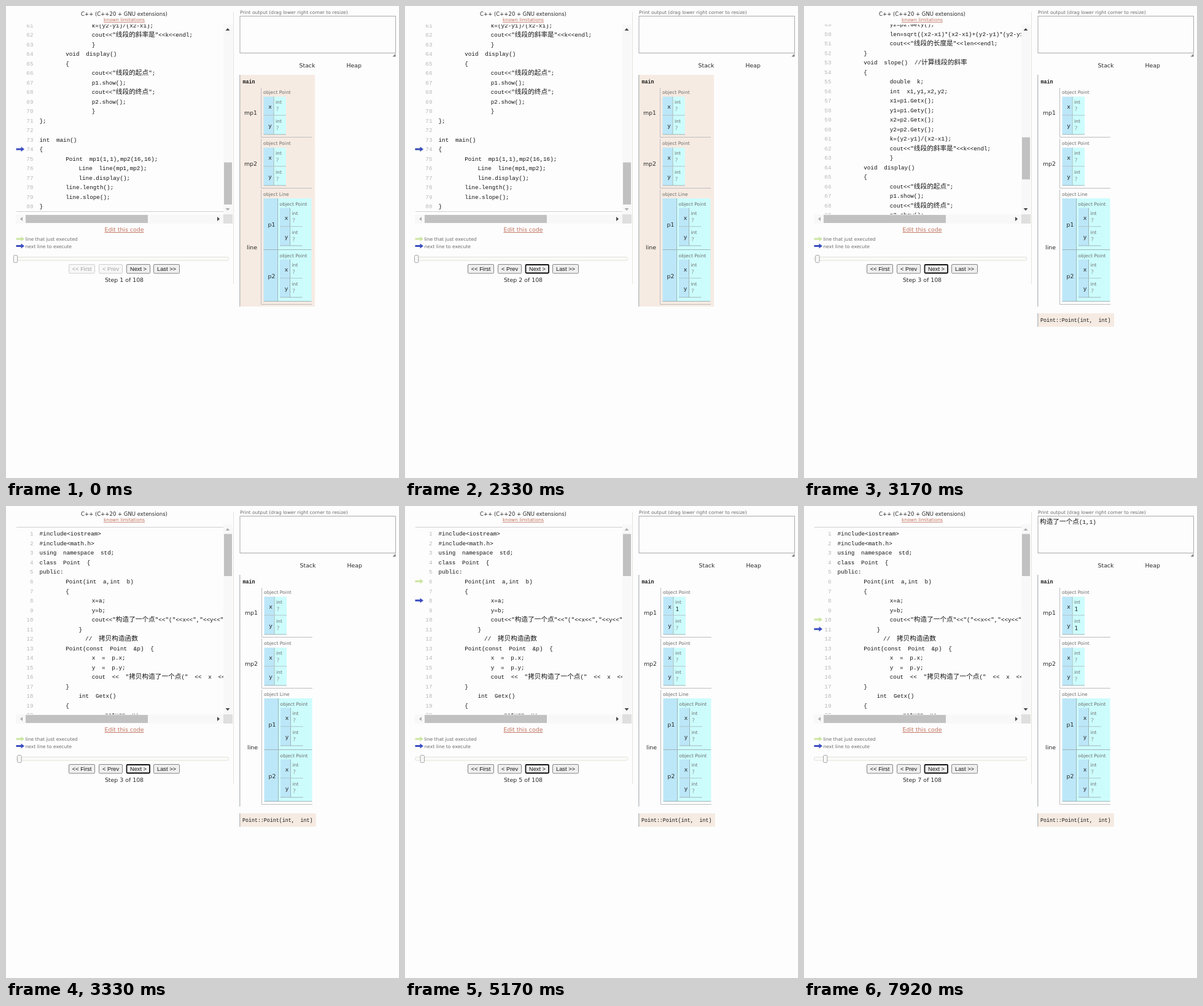
An HTML page for the animation above (8000 ms loop, 640 by 768 pixels).

```html
<!DOCTYPE html>
<html lang="en">
<head>
<meta charset="utf-8">
<title>Step-by-step code visualizer</title>
<style>
html, body { margin: 0; width: 100%; height: 100%; overflow: hidden; background: #fdfdfd; }
svg { display: block; width: 640px; height: 768px; }
text { font-family: "DejaVu Sans", sans-serif; font-size: 9.4px; fill: #2a2a2a; white-space: pre; }
.small { font-size: 7.6px; fill: #6c6c6c; }
.title { font-size: 8.5px; }
.link { fill: #c0705c; text-decoration: underline; }
.button { font: 9.3px "Liberation Sans", sans-serif; fill: #181818; }
.code { font: 9.3px "Liberation Mono", monospace; fill: #141414; }
.code tspan { font: 10.67px "Noto Sans CJK SC", "Noto Sans CJK", sans-serif; }
.call { font-size: 8.3px; }
.call tspan { font-size: 9.9px; }
.number { fill: #b8b8b8; }
.unset { fill: #8f9b9b; }
</style>
</head>
<body>
<svg id="stage" viewBox="0 0 640 768"></svg>
<script>
const PITCH = 15.52, MAX_SCROLL = 945, LOOP = 8000, FRAME = 250 / 3;
const STARTS = [0, 2300, 3103, 4290, 5165, 6050, 6920];
const NEXT_LINES = [74, 75, 6, 8, 9, 10, 11];
const SCROLL_START = 3105, SCROLL_TIME = 223;

const PAPER = "#fdfdfd", PEACH = "#f6ebe2", KEY = "#bce7f8", VALUE = "#cdfcfc";
const RULE = "#bdbdc2", CELL_RULE = "#9fb4b8", FRAME_EDGE = "#b9bfc2";
const TRACK = "#f8f8f8", THUMB = "#c1c1c1", DARK = "#484848", FADED = "#adadad";
const GREEN = "#cbe6a2", BLUE = "#3a4cc0";

const SOURCE = `#include<iostream>
#include<math.h>
using namespace std;
class Point {
public:
    Point(int a,int b)
    {
        x=a;
        y=b;
        cout<<"构造了一个点"<<"("<<x<<","<<y<<")"<<endl;
      }
       // 拷贝构造函数
    Point(const Point &p) {
        x = p.x;
        y = p.y;
        cout << "拷贝构造了一个点(" << x << "," << y << ")" << endl;
    }
      int Getx()
    {
          return x;
    }
      int Gety()
    {
          return y;
    }
    void show()
    {
        cout<<"("<<x<<","<<y<<")"<<endl;
    }
private:
    int x,y;
};

class Line {
private:
    Point p1,p2;
public:
    Line(Point a,Point b):p1(a),p2(b)
    {
    }
    void length() //计算线段的长度
    {
        double len;
        int x1,y1,x2,y2;
        x1=p1.Getx();
        y1=p1.Gety();

        x2=p2.Getx();
        y2=p2.Gety();
        len=sqrt((x2-x1)*(x2-x1)+(y2-y1)*(y2-y1));
        cout<<"线段的长度是"<<len<<endl;
    }
    void slope() //计算线段的斜率
    {
        double k;
        int x1,y1,x2,y2;
        x1=p1.Getx();
        y1=p1.Gety();
        x2=p2.Getx();
        y2=p2.Gety();
        k=(y2-y1)/(x2-x1);
        cout<<"线段的斜率是"<<k<<endl;
        }
    void display()
    {
        cout<<"线段的起点";
        p1.show();
        cout<<"线段的终点";
        p2.show();
        }
};

int main()
{
    Point mp1(1,1),mp2(16,16);
      Line line(mp1,mp2);
      line.display();
    line.length();
    line.slope();
}`.split("\n");

const escapeText = s => s.replace(/&/g, "&amp;").replace(/</g, "&lt;");
const text = (x, y, s, cls = "", extra = "") =>
  `<text x="${x}" y="${y}" class="${cls}" ${extra}>${escapeText(s)}</text>`;
const centered = (x, y, s, cls, extra = "") => text(x, y, s, cls, `text-anchor="middle" ${extra}`);
const rightAligned = (x, y, s, cls) => text(x, y, s, cls, 'text-anchor="end"');
const rect = (x, y, w, h, fill, extra = "") =>
  `<rect x="${x}" y="${y}" width="${w}" height="${h}" fill="${fill}" ${extra}/>`;
const path = (d, fill, extra = "") => `<path d="${d}" fill="${fill}" ${extra}/>`;
const line = (d, color) => path(d, "none", `stroke="${color}"`);

// Spaces and Chinese characters are full width, Latin characters half width.
const code = (x, y, s, cls = "", extra = "") =>
  `<text x="${x}" y="${y}" class="code ${cls}" ${extra}>` +
  escapeText(s).replace(/[ \u3000-\u9fff]+/g, m => `<tspan>${m.replace(/ /g, "\u3000")}</tspan>`) +
  "</text>";

const arrow = (id, color, y = 0) =>
  `<g id="${id}" transform="translate(16.5 ${y})">` +
  path("M0-1.5H8V-4L13.5 0L8 4V1.5H0Z", color) + "</g>";

const button = (x, w, label, id) => `<g id="${id}">` +
  rect(x + .5, 420.5, w - 1, 14.5, "#efefef", 'rx="1.5" stroke="#858585"') +
  centered(x + w / 2, 431, label, "button") + "</g>";

function listing() {
  const rows = SOURCE.map((s, i) => {
    const y = 48.4 + i * PITCH;
    return rightAligned(44.5, y, String(i + 1), "code number") + code(54.5, y, s);
  }).join("");
  const border = y => line(`M17 ${y}H355`, "#cfcfcf");
  return `<clipPath id="view"><rect x="12" y="30" width="342" height="309"/></clipPath>
    <g clip-path="url(#view)"><g id="listing">${border(34.5)}${border(1279.5)}${rows}
    ${arrow("executed", GREEN)}${arrow("next", BLUE)}</g></g>`;
}

function scrollbars() {
  return rect(354, 30, 15, 309, TRACK) + rect(16, 339, 338, 15, TRACK) +
    rect(354, 339, 15, 15, "#dfdfdf") + rect(32, 340, 199, 13, THUMB) +
    rect(355, 0, 13, 68.5, THUMB, 'id="thumb"') +
    path("M357.5 40H364.5L361 36Z", DARK, 'id="up"') +
    path("M357.5 329H364.5L361 333Z", DARK, 'id="down"') +
    path("M27 343V350L23 346.5Z", FADED) + path("M344 343V350L348 346.5Z", DARK);
}

function fields(x, y, prefix) {
  return ["x", "y"].map((name, i) => {
    const top = y + i * 31;
    return rect(x, top, 16, 30.5, KEY) + rect(x + 16, top, 20.5, 30.5, VALUE) +
      line(`M${x + 16.5} ${top}V${top + 30.5}M${x} ${top + 30.5}H${x + 36.5}`, CELL_RULE) +
      rightAligned(x + 13.3, top + 19, name) + text(x + 19.5, top + 11, "int", "small") +
      text(x + 20, top + 23.5, "?", "unset", `id="${prefix + name}"`);
  }).join("");
}

function variable(name, type, top, height, body) {
  return line(`M415.5 ${top}V${top + height}H498`, RULE) +
    rightAligned(409, top + height / 2 + 4, name) +
    text(419, top + 10, "object " + type, "small") + body;
}

function member(name, top) {
  return rect(419.5, top, 22.5, 83, KEY) + rect(442, top, 55.5, 83, VALUE) +
    line(`M442.5 ${top}V${top + 83}M419.5 ${top + 83.5}H497.5`, CELL_RULE) +
    rightAligned(438.5, top + 45.5, name) + text(445.5, top + 12, "object Point", "small") +
    fields(446, top + 15.5, name);
}

function stack() {
  return rect(380, 112, 123, 377, PEACH, 'id="mainFrame"') + rect(380, 112, 1.5, 377, FRAME_EDGE) +
    code(385.5, 126, "main", "call", 'style="font-weight:bold"') +
    '<g class="shifted">' +
    variable("mp1", "Point", 133, 80.5, fields(419.5, 147.5, "mp1")) +
    variable("mp2", "Point", 216, 80.5, fields(419.5, 230.5, "mp2")) +
    variable("line", "Line", 299, 186.5, member("p1", 313) + member("p2", 397)) + "</g>" +
    '<g id="callFrame">' + rect(380, 500, 125, 22, PEACH) + rect(380, 500, 1.5, 22, FRAME_EDGE) +
    code(385, 513.5, "Point::Point(int, int)", "call") + "</g>";
}

const stage = document.getElementById("stage");
stage.innerHTML =
  centered(192.5, 16, "C++ (C++20 + GNU extensions)", "title") +
  centered(192.5, 25, "known limitations", "small link", 'style="fill:#c0705c"') +
  listing() + scrollbars() +
  centered(192.5, 367, "Edit this code", "link") +
  arrow("legendExecuted", GREEN, 379) + text(31.5, 382, "line that just executed", "small") +
  arrow("legendNext", BLUE, 390.5) + text(31.5, 393.5, "next line to execute", "small") +
  rect(16.5, 408.5, 346, 5.5, "#fafaf8", 'rx="2" stroke="#e2e2da"') +
  rect(-3.2, 405.5, 6.4, 12, "#f8f8f8", 'id="knob" rx="2" stroke="#a4a4a4"') +
  button(102, 43, "<< First", "first") + button(151, 39, "< Prev", "prev") +
  button(196, 39, "Next >", "nextButton") + button(240, 43, "Last >>", "last") +
  rect(196.5, 421, 37.5, 13.5, "none", 'id="focus" rx="1.5" stroke="#141414" stroke-width="1.8"') +
  centered(192.5, 448.5, "", "", 'id="step"') +
  line("M370.5 10V452", "#e3e3dc") +
  text(381, 12.5, "Print output (drag lower right corner to resize)", "small") +
  rect(381, 16.5, 253.5, 60, PAPER, 'stroke="#a9a9ae"') +
  code(384, 28.5, "构造了一个点(1,1)", "", 'id="output"') +
  path("M634.5 77.5V82.5H629.5Z", "#808080") +
  `<g class="shifted">${text(477.5, 100, "Stack")}${text(554.5, 100, "Heap")}</g>` + stack();

const el = id => document.getElementById(id);
const show = (id, on) => el(id).setAttribute("visibility", on ? "visible" : "hidden");
const clamp = v => Math.max(0, Math.min(1, v));
const mix = (a, b, p) => a + (b - a) * p;
const cubic = p => p < .5 ? 4 * p ** 3 : 1 - 4 * (1 - p) ** 3;
const swing = p => .5 - Math.cos(Math.PI * p) / 2;

function setValue(id, known) {
  el(id).textContent = known ? "1" : "?";
  el(id).setAttribute("class", known ? "" : "unset");
}

function placeArrow(id, from, to, progress) {
  const y = 45 + (mix(from, to, cubic(clamp(progress))) - 1) * PITCH;
  el(id).setAttribute("transform", `translate(16.5 ${y})`);
}

function render(t) {
  const step = STARTS.filter(start => start <= t).length - 1;
  const elapsed = t - STARTS[step];
  const before = Math.max(step - 1, 0);

  // The executed arrow moves first; the next arrow follows after a pause.
  placeArrow("executed", NEXT_LINES[Math.max(step - 2, 0)], NEXT_LINES[before], elapsed / 200);
  placeArrow("next", NEXT_LINES[before], NEXT_LINES[step], (elapsed - 400) / 250);
  show("executed", step > 0);

  const scroll = MAX_SCROLL * (1 - swing(clamp((t - SCROLL_START) / SCROLL_TIME)));
  el("listing").setAttribute("transform", `translate(0 ${-scroll})`);
  el("thumb").setAttribute("y", 45.5 + 209 * scroll / MAX_SCROLL);
  el("up").setAttribute("fill", scroll > 0 ? DARK : FADED);
  el("down").setAttribute("fill", scroll < MAX_SCROLL ? DARK : FADED);

  el("knob").setAttribute("transform", `translate(${15.5 + 3.2 * step} 0)`);
  el("step").textContent = `Step ${step + 1} of 108`;
  for (const id of ["first", "prev"]) el(id).setAttribute("opacity", step ? 1 : .38);
  show("focus", step > 0);

  const inCall = step > 1;
  show("mainFrame", !inCall);
  show("callFrame", inCall);
  for (const group of document.querySelectorAll(".shifted"))
    group.setAttribute("transform", `translate(${inCall ? 1 : 0} 0)`);
  setValue("mp1x", step > 3);
  setValue("mp1y", step > 4);
  show("output", step > 5);
}

// Twelve pictures a second, each starting on a whole hundredth.
const frameStart = i => Math.round(i * FRAME / 10) * 10;
function heldTime(t) {
  const i = Math.round(t / FRAME);
  return frameStart(frameStart(i) > t ? i - 1 : i);
}

const origin = performance.now();
function tick() {
  render(heldTime(Math.max(0, performance.now() - origin) % LOOP));
  requestAnimationFrame(tick);
}
tick();
</script>
</body>
</html>
```
